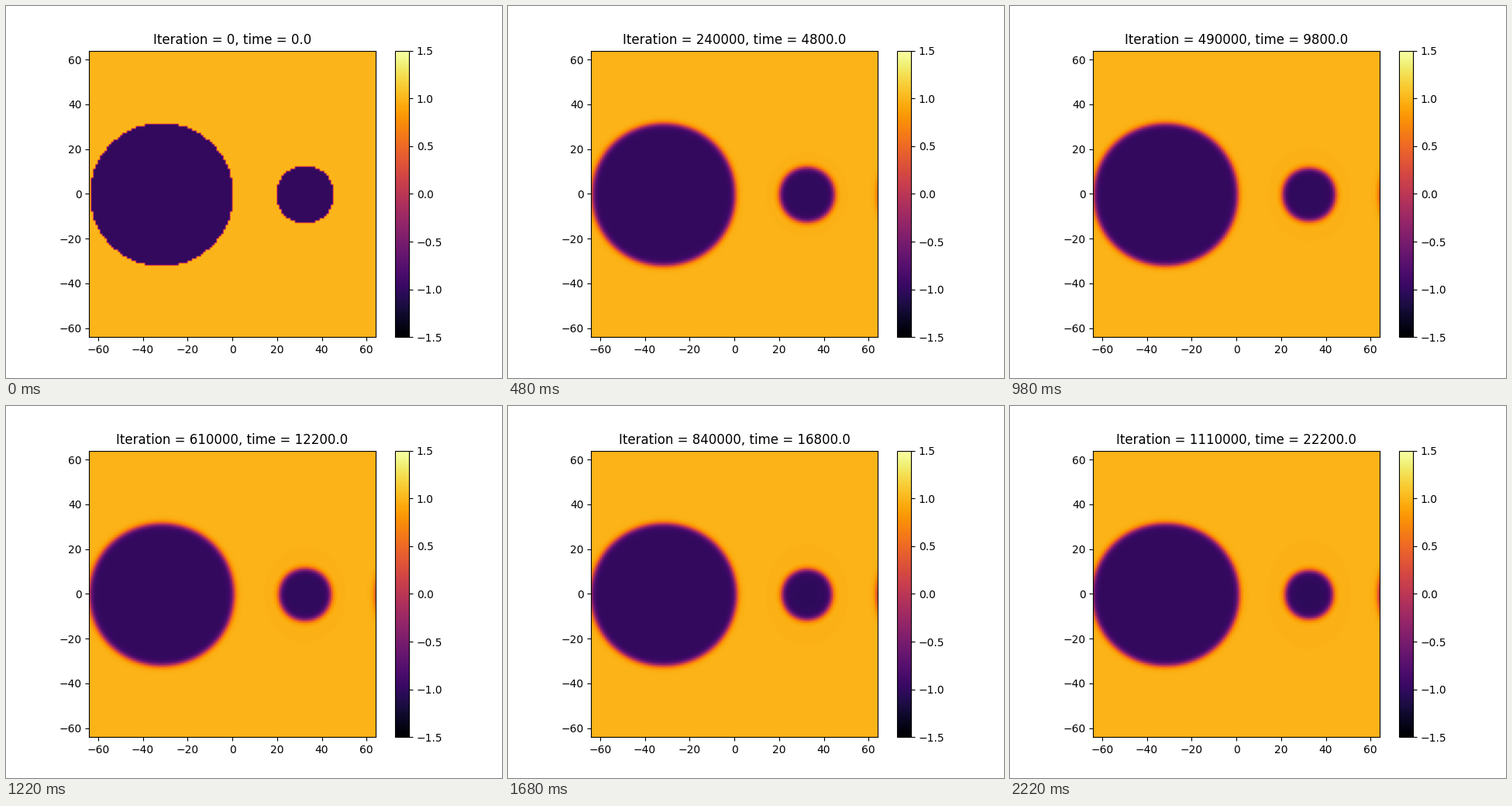
These frames come from a looping animation (640x480 px, 2.24 s). A matplotlib script:

```python
import numpy as np
import matplotlib.pyplot as plt
from matplotlib.animation import FuncAnimation

SIZE = 128
FRAMES = 112
INTERVAL = 20
ITERS_PER_FRAME = 10000
DT = 0.02

# Solver: model time per frame is 0.1 (mobility) * 200
STEPS_PER_FRAME = 20
STEP = 1.0
STABILISER = 2.0


def two_drops():
    """Field of +1 holding a large and a small disc of -1."""
    axis = np.arange(SIZE) - SIZE // 2
    x, y = np.meshgrid(axis, axis)
    field = np.ones((SIZE, SIZE))
    for centre, radius in ((-32, 32), (32, 13)):
        field[(x - centre) ** 2 + y ** 2 < radius ** 2] = -1
    return field


def evolve(field):
    """Cahn-Hilliard coarsening on a periodic grid, one field per frame."""
    kx = 2 - 2 * np.cos(2 * np.pi * np.fft.rfftfreq(SIZE))
    ky = 2 - 2 * np.cos(2 * np.pi * np.fft.fftfreq(SIZE))
    k2 = ky[:, None] + kx[None, :]
    gain = STEP * k2
    damping = 1 / (1 + gain * (STABILISER + k2))
    fields = [field]
    spectrum = np.fft.rfft2(field)
    for _ in range(FRAMES - 1):
        for _ in range(STEPS_PER_FRAME):
            force = np.fft.rfft2(field * (field * field - 1 - STABILISER))
            spectrum = (spectrum - gain * force) * damping
            field = np.fft.irfft2(spectrum, s=field.shape)
        fields.append(field)
    return fields


fields = evolve(two_drops())

fig, ax = plt.subplots(figsize=(6.4, 4.8), dpi=100)
half = SIZE // 2
image = ax.imshow(fields[0], cmap="inferno", vmin=-1.5, vmax=1.5,
                  extent=(-half, half, -half, half))
fig.colorbar(image, ax=ax)
title = ax.set_title("")


def draw(frame):
    iteration = frame * ITERS_PER_FRAME
    image.set_data(fields[frame])
    title.set_text(f"Iteration = {iteration}, time = {iteration * DT:.1f}")
    return image, title


anim = FuncAnimation(fig, draw, frames=FRAMES, interval=INTERVAL,
                     init_func=lambda: draw(0), repeat=True, repeat_delay=0)
plt.show()
```
